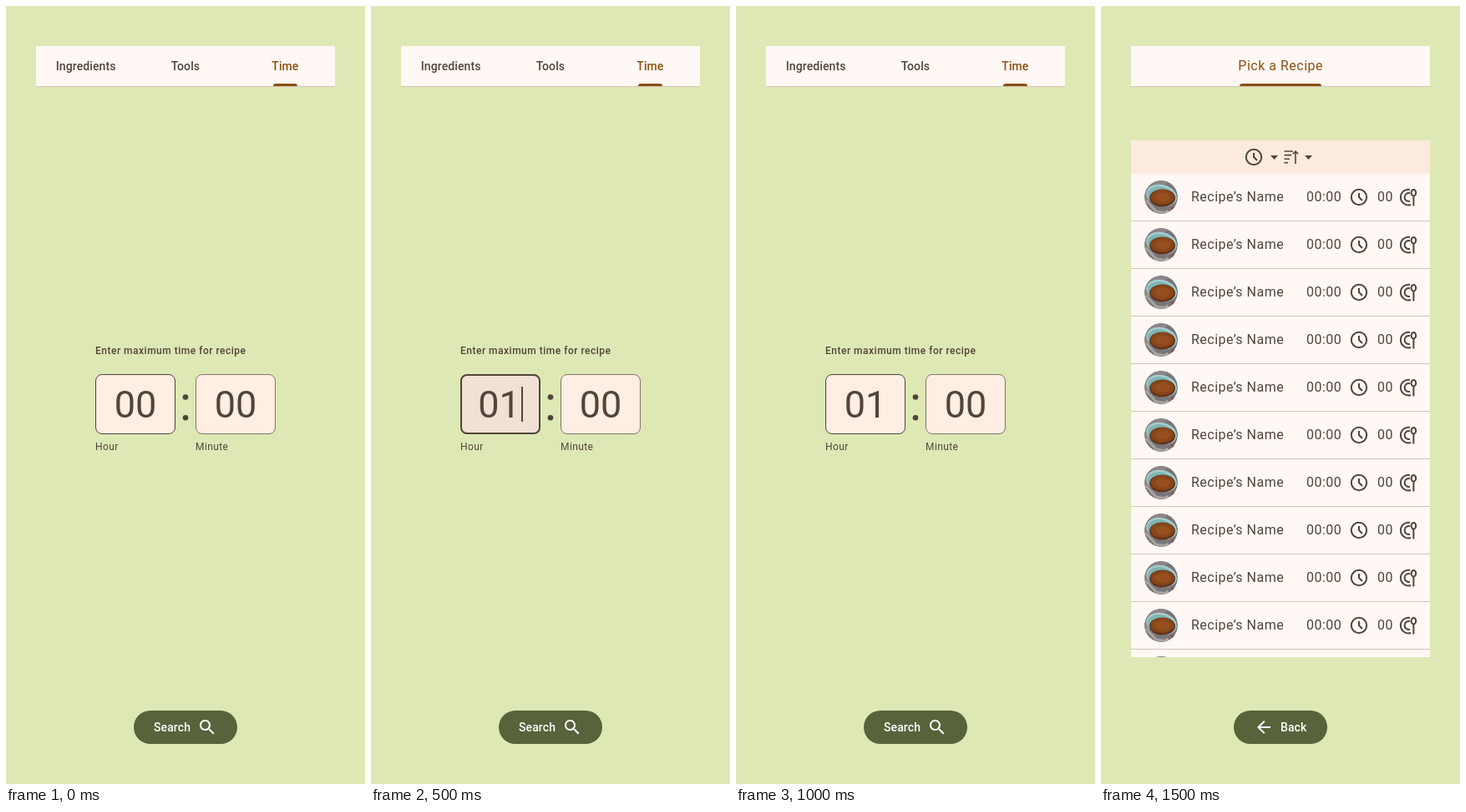
Write an HTML page that moves like this. It is 430 px wide and 932 px high and loops after 2000 ms.

```html
<!DOCTYPE html>
<html lang="en">
<head>
<meta charset="utf-8">
<title>Recipe search</title>
<style>
  html, body { margin: 0; width: 100%; height: 100%; overflow: hidden; background: #dee8b4; }
  svg { display: block; width: 430px; height: 932px; }
  text { font-family: Roboto, sans-serif; fill: #51443a; }
  .label { font-size: 14px; font-weight: 500; letter-spacing: .1px; }
  .body { font-size: 16px; letter-spacing: .5px; }
  .title { font-size: 12px; font-weight: 500; letter-spacing: .5px; }
  .small { font-size: 12px; letter-spacing: .4px; }
  .digits { font-size: 45px; }
  .mid { text-anchor: middle; }
  .accent { fill: #8b5010; }
  .white { fill: #fff; }
  .button { fill: #58633b; }
  .ink { fill: #51443a; }
  .line { fill: none; stroke: #51443a; stroke-width: 2; }
</style>
</head>
<body>
<svg viewBox="0 0 430 932">
  <defs>
    <clipPath id="disc"><circle r="20"/></clipPath>
    <clipPath id="panel"><rect x="36" y="161" width="358" height="619"/></clipPath>
    <g id="clock">
      <circle class="line" r="9.2"/>
      <path class="ink" d="M3.3 4.7l1.4-1.4L1-.4V-5h-2V.4z"/>
    </g>
    <g id="dish" class="line">
      <path d="M2-9A9.3 9.3 0 1 0 3 9"/>
      <path d="M2-4.8A5 5 0 1 0 2 4.8"/>
      <ellipse cx="6.4" cy="-5.3" rx="2.8" ry="3.7"/>
      <path d="M6.4-1.6V10.5"/>
    </g>
    <g id="photo" clip-path="url(#disc)">
      <circle r="20" fill="#77767b"/>
      <path d="M-20-3L-8-20H10L-19 8z" fill="#8d8588"/>
      <path d="M-18 4L-6 17 14 20" fill="none" stroke="#aaa39f" stroke-width="3"/>
      <ellipse cx="0" cy="-2" rx="18.5" ry="13" transform="rotate(14)" fill="#a5cfce"/>
      <ellipse cx="0" cy="-1" rx="17" ry="11.5" transform="rotate(14)" fill="#80b5b5"/>
      <ellipse cx="1.5" cy="1" rx="15.5" ry="10.5" fill="#63341d"/>
      <ellipse cx="1.5" cy="0" rx="14" ry="9" fill="#884619"/>
      <ellipse cx="2" cy="0" rx="9" ry="5.5" fill="#964f20"/>
      <circle cx="14" cy="13" r="2.2" fill="#a44a45"/>
      <circle cx="7" cy="17" r="1.8" fill="#c2aa92"/>
    </g>
    <g id="row">
      <use href="#photo" x="72" y="28"/>
      <text class="body" x="108" y="33">Recipe’s Name</text>
      <text class="body" x="246" y="33">00:00</text>
      <use href="#clock" x="309" y="28"/>
      <text class="body" x="331" y="33">00</text>
      <use href="#dish" x="368" y="28"/>
      <rect x="36" y="56" width="358" height="1" fill="#d6c3b5"/>
    </g>
  </defs>

  <rect width="430" height="932" fill="#dee8b4"/>
  <rect x="36" y="48" width="358" height="49" fill="#fff8f5"/>
  <rect x="36" y="96" width="358" height="1" fill="#d6c3b5"/>

  <g id="form">
    <text class="label mid" x="95.7" y="77">Ingredients</text>
    <text class="label mid" x="215" y="77">Tools</text>
    <text class="label mid accent" x="334.4" y="77">Time</text>
    <path class="accent" d="M320 96v0a3 3 0 0 1 3-3h23a3 3 0 0 1 3 3z"/>

    <text class="title" x="107" y="417">Enter maximum time for recipe</text>
    <rect id="hourBox" stroke="#51443a"/>
    <text id="hour" class="digits mid" y="493"></text>
    <rect id="caret" class="ink" x="180" y="456" width="2" height="42"/>
    <circle class="ink" cx="215" cy="468.5" r="3.3"/>
    <circle class="ink" cx="215" cy="493.2" r="3.3"/>
    <rect x="227.5" y="441.5" width="95" height="71" rx="7.5" fill="#ffeee3" stroke="#84746a"/>
    <text class="digits mid" x="275" y="493">00</text>
    <text class="small" x="107" y="532">Hour</text>
    <text class="small" x="227" y="532">Minute</text>

    <rect class="button" x="153" y="844" width="124" height="40" rx="20"/>
    <text class="label white" x="177" y="869">Search</text>
    <path class="white" transform="translate(229 852)" d="M15.5 14h-.79l-.28-.27C15.41 12.59 16 11.11 16 9.5 16 5.91 13.09 3 9.5 3S3 5.91 3 9.5 5.91 16 9.5 16c1.61 0 3.09-.59 4.23-1.57l.27.28v.79l5 4.99L20.49 19l-4.99-5zm-6 0C7.01 14 5 11.99 5 9.5S7.01 5 9.5 5 14 7.01 14 9.5 11.99 14 9.5 14z"/>
  </g>

  <g id="results">
    <text class="body mid accent" x="215.2" y="77">Pick a Recipe</text>
    <path class="accent" d="M166 96a3 3 0 0 1 3-3h92a3 3 0 0 1 3 3z"/>
    <g clip-path="url(#panel)">
      <rect x="36" y="161" width="358" height="619" fill="#fff8f5"/>
      <rect x="36" y="161" width="358" height="40" fill="#fceade"/>
      <use href="#clock" x="183" y="181"/>
      <path class="ink" d="M203 179h9l-4.5 5zM244 179h9l-4.5 5z"/>
      <path class="line" stroke-width="1.7" d="M219.5 174h10.5M219.5 178.6h8.5M219.5 183.2h6.5M219.5 187.8h4.5M233 189V174.5M229.8 177.3l3.2-3.2 3.2 3.2" style="stroke-width:1.6"/>
      <g id="rows"></g>
    </g>
    <rect class="button" x="159" y="844" width="112" height="40" rx="20"/>
    <path class="white" transform="translate(183 852)" d="M20 11H7.83l5.59-5.59L12 4l-8 8 8 8 1.41-1.41L7.83 13H20v-2z"/>
    <text class="label white" x="215" y="869">Back</text>
  </g>
</svg>
<script>
  const get = id => document.getElementById(id);
  const set = (el, attrs) => {
    for (const key in attrs) el.setAttribute(key, attrs[key]);
  };
  const show = (el, on) => set(el, { visibility: on ? "visible" : "hidden" });

  const LOOP = 2000, STEP = 500;
  const form = get("form"), results = get("results");
  const hour = get("hour"), hourBox = get("hourBox"), caret = get("caret");

  for (let i = 0; i < 11; i++) {
    const row = document.createElementNS("http://www.w3.org/2000/svg", "use");
    set(row, { href: "#row", y: 201 + 57 * i });
    get("rows").append(row);
  }

  function draw(time) {
    const stage = Math.floor((time % LOOP) / STEP);
    const focused = stage === 1;
    const stroke = focused ? 2 : 1;
    form.style.display = stage < 3 ? "" : "none";
    results.style.display = stage < 3 ? "none" : "";
    set(hourBox, {
      x: 107 + stroke / 2, y: 441 + stroke / 2,
      width: 96 - stroke, height: 72 - stroke, rx: 8 - stroke / 2,
      fill: focused ? "#f0e0d5" : "#ffeee3", "stroke-width": stroke
    });
    hour.textContent = stage ? "01" : "00";
    set(hour, { x: focused ? 153.5 : 155 });
    show(caret, focused);
  }

  const start = performance.now();
  function tick() {
    draw(performance.now() - start);
    requestAnimationFrame(tick);
  }
  tick();
</script>
</body>
</html>
```
